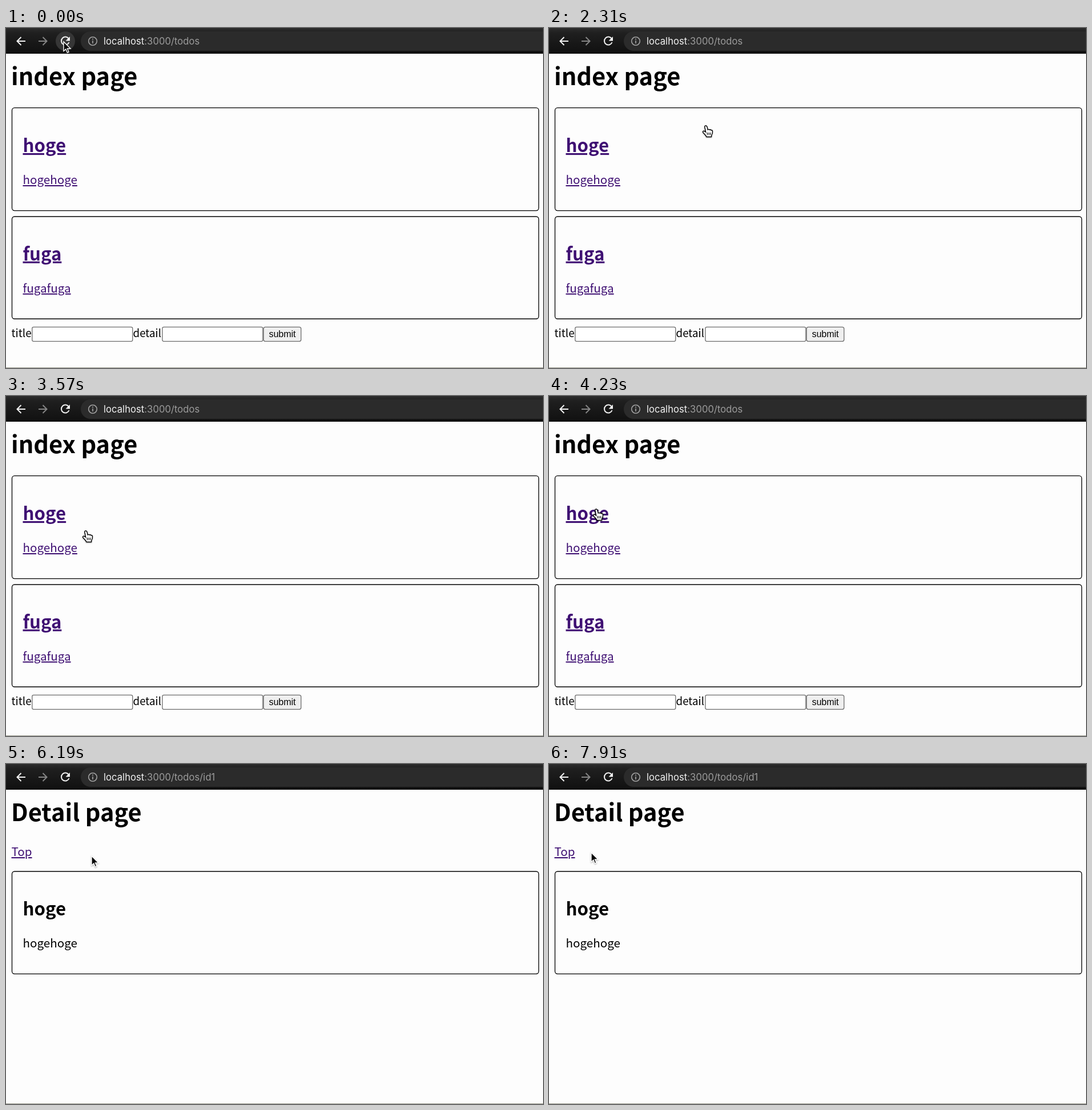
Recreate the animation shown at these times as an HTML page. Size 941x595 px, loop 8 s.

```html
<!DOCTYPE html>
<html lang="en">
<head>
<meta charset="utf-8">
<title>Todo pages</title>
<style>
  html, body { margin: 0; width: 100%; height: 100%; overflow: hidden; background: #fdfdfd; }
  svg { display: block; }
  text { font: 20.6px "Noto Sans CJK JP", "Noto Sans CJK", sans-serif; }
  .h1 { font-size: 41.6px; font-weight: 700; }
  .h2 { font-size: 31.2px; font-weight: 700; }
  .label { font-size: 18.8px; }
  .link { fill: #3f1073; text-decoration: underline; }
  .url { font: 16.7px Inter, sans-serif; fill: #9c9c9c; white-space: pre; }
  .button { font: 16px "Liberation Sans", Arial, sans-serif; }
  .card { fill: none; stroke: #000; stroke-width: 1.3; }
  .field { fill: #fff; stroke: #6c6c6c; stroke-width: 1.3; }
  .icon { fill: none; stroke: #f2f2f2; stroke-width: 2; }
</style>
</head>
<body>
<svg width="941" height="595" viewBox="0 0 941 595">
  <defs>
    <linearGradient id="bar" x2="0" y2="1">
      <stop offset="0" stop-color="#2c2c2c"/>
      <stop offset=".2" stop-color="#1f1f1f"/>
      <stop offset="1" stop-color="#101010"/>
    </linearGradient>
  </defs>
  <rect width="941" height="595" fill="#fdfdfd"/>
  <path d="M0 594.5H941" stroke="#96968a"/>

  <rect width="941" height="45" fill="url(#bar)"/>
  <rect x="131" y="6" width="840" height="34" rx="17" fill="#2b2b2b"/>
  <circle id="hover" cx="104" cy="23" r="17" fill="#363636"/>
  <path class="icon" d="M34 23H20M26.5 16 19.5 23l7 7"/>
  <path class="icon" d="M57 23H71M64.5 16 71.5 23l-7 7" style="stroke:#858585"/>
  <path class="icon" d="M110 19A7 7 0 1 0 110.5 25"/>
  <path d="M112 15v7.5h-7.5z" fill="#f2f2f2"/>
  <circle class="icon" cx="152" cy="23" r="7.3" style="stroke:#a2a2a2;stroke-width:1.6"/>
  <path d="M152 22v5M152 18.5v2" stroke="#a2a2a2" stroke-width="1.7"/>
  <text class="url" x="171" y="29"><tspan fill="#f2f2f2">localhost</tspan><tspan id="path"></tspan></text>

  <g id="index">
    <text class="h1" x="9" y="100">index page</text>
    <rect class="card" x="10.5" y="139.6" width="923" height="180" rx="4.5"/>
    <text class="h2 link" x="29.5" y="217">hoge</text>
    <text class="link" x="29.5" y="273">hogehoge</text>
    <rect class="card" x="10.5" y="330" width="923" height="179" rx="4.5"/>
    <text class="h2 link" x="29.5" y="406.5">fuga</text>
    <text class="link" x="29.5" y="462.5">fugafuga</text>
    <text class="label" x="9.5" y="541">title</text>
    <rect class="field" x="45.8" y="523.3" width="176" height="25" rx="2.5"/>
    <text class="label" x="222.5" y="541">detail</text>
    <rect class="field" x="274" y="523.3" width="176" height="25" rx="2.5"/>
    <rect class="field" x="451.3" y="523.3" width="65.7" height="25" rx="3" style="fill:#efefef"/>
    <text class="button" x="484.2" y="541" text-anchor="middle">submit</text>
  </g>

  <g id="detail">
    <text class="h1" x="9" y="100">Detail page</text>
    <text class="link" x="9.5" y="161">Top</text>
    <rect class="card" x="10.5" y="188" width="923" height="179.3" rx="4.5"/>
    <text class="h2" x="29.5" y="265">hoge</text>
    <text x="29.5" y="321">hogehoge</text>
  </g>

  <g id="cursor" style="filter:drop-shadow(0 1px 1px #0005)">
    <path id="arrow" d="M0 0V16.5L3.8 13 6.4 19 9 18 6.5 12H12Z" stroke="#fff" stroke-width="1.4"/>
    <g id="hand" fill="#fff" stroke="#000" stroke-width="1.4">
      <path d="M-2.2 2Q-2-.3 0 0 1.5.2 2 2L3.2 7Q5 5.6 6.2 7.2 8 6 9 7.8 11 7.2 11.5 9.5 12 13 9.8 16.5L9.5 19.5H1Q0 17-4.5 12.5-6.5 10-4.5 9.3-2.5 9-.4 11Z"/>
      <path d="M2.4 12v4.2M5 12v4.2M7.6 12v4.2" stroke-width="1.1"/>
    </g>
  </g>
</svg>
<script>
const LOOP = 8000, NAVIGATE = 4600;
// Pointer stops: time, x, y
const stops = [
  [0, 101, 24], [1430, 101, 24], [1610, 102, 25], [1750, 102, 25],
  [2310, 275, 171], [2450, 275, 176], [3010, 155, 246], [3390, 150, 243],
  [4130, 83, 198], [4950, 82, 198], [5070, 82, 198], [5810, 148, 164],
  [6190, 150, 161], [6750, 150, 161], [7800, 74, 155], [LOOP, 74, 155]
];
const el = id => document.getElementById(id);
const show = (id, on) => { el(id).style.display = on ? "" : "none"; };

function pointerAt(t) {
  const i = stops.findIndex(stop => stop[0] > t);
  const [t0, x0, y0] = stops[i - 1], [t1, x1, y1] = stops[i];
  const u = (t - t0) / (t1 - t0), k = u * u * (3 - 2 * u);
  return [x0 + (x1 - x0) * k, y0 + (y1 - y0) * k];
}

function draw(now) {
  const t = now % LOOP, onIndex = t < NAVIGATE;
  const [x, y] = pointerAt(t);
  const overCard = onIndex && (y > 139 && y < 320 || y > 329 && y < 510);
  show("index", onIndex);
  show("detail", !onIndex);
  show("hover", Math.hypot(x - 104, y - 23) < 17);
  show("hand", overCard);
  show("arrow", !overCard);
  el("path").textContent = ":3000/todos" + (onIndex ? "" : "/id1");
  el("cursor").setAttribute("transform", `translate(${Math.round(x)} ${Math.round(y)})`);
}

const start = performance.now();
function tick() {
  draw(performance.now() - start);
  requestAnimationFrame(tick);
}
tick();
</script>
</body>
</html>
```
